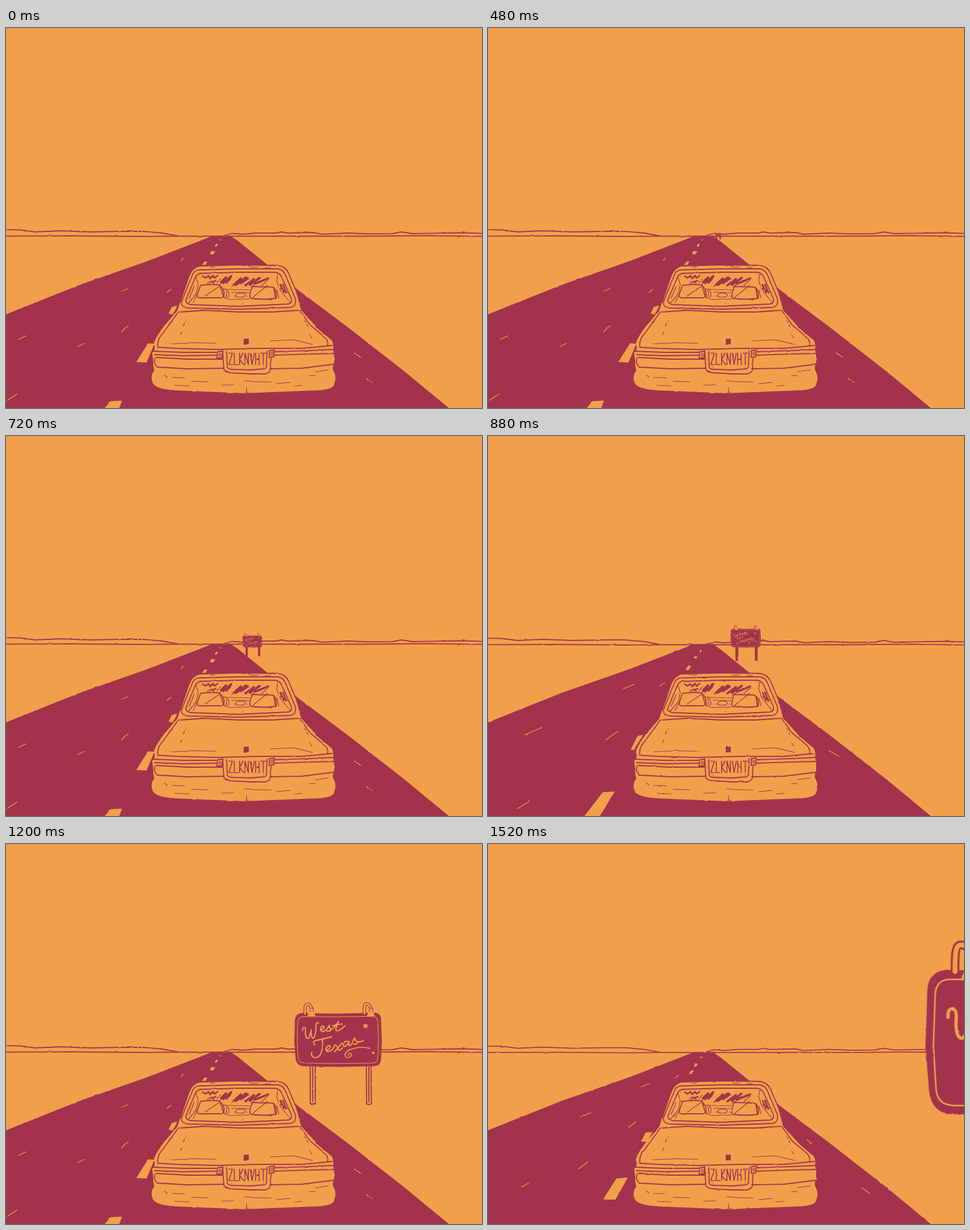
Recreate the animation shown at these times as an HTML page. Size 837 by 669 pixels, loop 1.6 s.

```html
<!DOCTYPE html>
<html lang="en">
<head>
<meta charset="utf-8">
<title>Desert road</title>
<style>
  html, body { margin: 0; width: 100%; height: 100%; overflow: hidden; background: #f0a04b; }
  svg { display: block; width: 837px; height: 669px; }
  .ink { fill: none; stroke: #a3334c; stroke-width: 1.8; stroke-linecap: round; stroke-linejoin: round; }
  .thin { stroke-width: 1.2; }
  .bold { stroke-width: 4; }
  .mid { stroke-width: 2.6; }
  .dark { fill: #a3334c; }
  .light { fill: #f0a04b; }
  .chalk { fill: none; stroke: #f0a04b; stroke-linecap: round; stroke-linejoin: round; }
  #legs path { vector-effect: non-scaling-stroke; stroke-width: 2; }
</style>
</head>
<body>
<svg viewBox="0 0 837 669">
  <defs>
    <filter id="rough" filterUnits="userSpaceOnUse" x="-10" y="-10" width="857" height="689" color-interpolation-filters="sRGB">
      <feTurbulence id="noise" type="fractalNoise" baseFrequency=".08" numOctaves="2" seed="3" result="n"/>
      <feDisplacementMap in="SourceGraphic" in2="n" scale="2" xChannelSelector="R" yChannelSelector="G"/>
    </filter>

    <g id="lamp">
      <path class="ink" style="stroke-width:10" d="M33 3 C33-16 33-28 40-28 C47-28 50-20 55-12"/>
      <path class="chalk" stroke-width="5.5" d="M33 3 C33-16 33-28 40-28 C47-28 50-20 55-12"/>
      <path class="ink" style="fill:#f0a04b" d="M47-4 Q48-13 54-15 Q60-13 60-4Z"/>
      <path class="light" d="M47-4 H60 L66 11 H40Z"/>
    </g>
  </defs>

  <g filter="url(#rough)">
    <rect class="light" x="-10" y="-10" width="857" height="689"/>

    <g id="hills" class="ink">
      <path d="M-9 366.5 L120 366 240 367 300 366.5 480 366.5 640 366.5 740 365.5 846 367"/>
      <path d="M-9 355 L25 355.5 52 359 95 357 150 359 205 358 240 358 275 361 302 366"/>
      <path d="M384 365 L398 361.5 415 363 440 361 475 361 484 359 495 361 540 360 556 363 600 361 640 362.5 680 362 695 359 715 362 770 361 805 360.5 846 362"/>
    </g>

    <path class="dark" d="M-10 508 L60 480 130 452 250 410 330 379 362 366.5 395 366 408 375 455 413 512 460 600 526 700 604 792 680 H-10Z"/>
    <path id="dashes" class="light"/>
    <path id="specks" class="chalk" stroke-width="1.2"/>

    <g id="sign">
      <g id="legs" class="ink">
        <path style="fill:#f0a04b" d="M49 165 L49 286 Q57 290 65 286 L65 165Z"/>
        <path style="fill:#f0a04b" d="M225 165 L226 286 Q233 290 241 286 L240 165Z"/>
        <path d="M57 170V280M233 170V280"/>
      </g>
      <path class="dark" d="M1 24 Q2 4 22 1 L130 3 250 0 Q271 1 271 22 L274 90 271 148 Q270 166 250 168 L140 170 26 168 Q6 165 3 142 L-1 90Z"/>
      <path class="chalk" stroke-width="1.8" d="M10 32 Q10 12 28 12 L130 13 244 11 Q261 12 261 29 L263 90 261 141 Q260 157 244 158 L130 160 30 158 Q12 157 11 138 L8 90Z"/>
      <use href="#lamp"/>
      <use href="#lamp" x="186"/>
      <g class="chalk" stroke-width="3.8">
        <path d="M25 56 Q24 46 31 46 Q36 48 34 64 Q35 82 42 80 Q49 74 52 54 Q51 80 59 80 Q67 72 68 34 Q71 29 75 33"/>
        <path d="M81 54 Q95 50 92 43 Q85 39 81 51 Q81 64 95 57 Q105 49 109 39 Q108 46 114 52 Q113 60 102 57"/>
        <path d="M114 53 Q124 50 138 27 Q124 58 133 57 Q146 54 158 41 M119 41 L149 35"/>
        <path d="M66 101 Q53 92 66 87 Q84 84 116 75 M86 85 Q92 105 82 129 Q74 144 60 140 Q51 136 54 124"/>
        <path d="M99 118 Q115 112 111 104 Q102 101 98 115 Q101 128 118 116 L127 101 Q133 102 138 117 Q141 121 150 110 M149 95 L125 123"/>
        <path d="M170 91 Q158 86 153 99 Q153 110 162 104 Q169 97 171 90 Q167 108 177 101 L188 79 Q189 86 198 92 Q197 100 184 98 M198 92 Q207 91 216 88"/>
        <path stroke-width="3" d="M236 112 Q208 104 183 113 Q160 119 158 133 Q160 143 171 140 Q182 136 177 128 Q169 125 169 133"/>
      </g>
      <path class="light" d="M222 32 l3 6 7 0 -5 5 2 7 -7-4 -6 4 2-7 -5-5 7 0Z"/>
      <circle class="light" cx="247" cy="126" r="4"/>
    </g>

    <g id="car" class="ink">
      <path class="light" stroke="none" d="M322 436 Q328 422 340 419 L410 417 478 418 Q492 420 497 432 L510 464 519 497 550 531 573 550 Q577 558 575 566 L577 574 577 590 Q572 599 577 606 Q582 616 576 630 Q570 637 545 638 L420 643 300 638 Q263 636 258 625 Q253 612 261 603 Q258 595 259 588 L257 572 Q264 566 260 556 Q262 546 277 526 L301 498 306 483Z"/>
      <path d="M306 483 L322 436 Q328 422 340 419 L410 417 478 418 Q492 420 497 432 L511 465"/>
      <path d="M338 426 L410 424 479 424 Q488 426 492 436 L509 477 Q511 490 500 492 L410 495 320 493 Q306 491 309 481 L328 434 Q331 427 338 426Z"/>
      <path d="M342 432 L410 430 473 430 Q482 431 485 439 L502 477 Q504 485 495 486 L410 490 325 487 Q314 485 317 477 L333 439 Q336 433 342 432Z"/>
      <g class="thin">
        <path d="M334 439 L338 451 335 468 320 485 M336 470 L329 483 M322 476 L331 455 M478 433 L476 445 481 460 500 484 M476 461 L480 475"/>
        <path d="M360 421 l7 -.5 M430 421 l13 0 M455 422 l10 0"/>
        <path d="M386 460 L429 461 M390 478 L428 477 M397 465 L427 466 M400 472 h2 M424 472 h2 M417 485 v.5 M404 469 Q411 465 420 468 Q423 474 412 474 Q402 474 404 469Z"/>
        <path d="M354 450 Q358 443 366 449 M356 452 L362 446 368 453 M383 459 Q393 461 392 471 Q390 479 384 475 M386 463 Q390 469 386 474"/>
      </g>
      <path style="fill:#f0a04b" d="M342 453 Q360 451 376 452 L382 472 Q382 476 374 475 L340 475 Q335 475 337 468Z M379 456 Q385 463 383 474"/>
      <path style="fill:#f0a04b" d="M432 455 L468 456 Q472 457 472 464 L474 476 Q455 479 431 476 Q427 475 430 464Z M471 457 Q477 465 475 476"/>
      <path class="thin" d="M350 472 L378 453 M434 474 L460 453"/>
      <path class="mid" d="M346 437 L351 440 356 436 359 441 364 436 367 440 372 436 M361 447 l8 -2 M483 452 L489 466 M484 459 L494 465 M487 451 L493 466"/>
      <path class="bold" d="M378 448 L387 439 M382 449 L396 437 M388 448 L394 441 M401 452 L413 441 M405 452 L422 439 M413 449 L425 441 M421 453 L436 442 M429 452 L446 440 M438 450 L461 441"/>
      <path class="thin" d="M430 456 L448 445 M450 453 L461 444 M397 455 L402 450 M371 448 L377 442"/>

      <path d="M306 500 L350 497 410 500 470 500 515 497 M303 500 L285 525 270 545 Q266 552 267 562 M517 498 L535 523 560 544 Q568 552 565 560"/>
      <path d="M267 562 L300 564 370 566 440 564 520 564 574 559 M259 569 L310 571 370 571 M473 570 L530 568 576 566"/>
      <path class="thin" d="M290 556 L330 554 369 555 M465 551 L505 549 539 557 M314 519 l-2 6 M317 515 v1 M309 535 l-2 5 M525 515 l3 4 M529 522 l2 4 M534 541 l4 5"/>
      <path d="M261 575 L310 577 371 576 M473 576 L530 574 577 573 M264 580 L320 583 380 583 M266 597 L320 600 382 599 M464 600 L520 599 576 592 M262 581 Q259 590 266 597"/>
      <path d="M372 570 L381 569 380 581 371 581Z M463 568 L472 567 471 579 463 580Z"/>
      <path class="thin" d="M375 573 h3 v5 h-3Z M466 571 h3 v5 h-3Z"/>
      <path d="M381 568 L383 600 Q384 606 395 607 L430 609 456 609 Q465 607 465 600 L466 582"/>
      <path d="M388 570 L389 597 Q390 601 397 601 L430 602 454 600 Q458 599 458 594 L459 569"/>
      <path class="thin" d="M396 597 v1 M452 596 v1 M279 611 l4 4 M292 615 L314 616 M326 622 L354 623 M420 621 L443 623 466 623 M297 629 L322 630 M379 629 L400 628 M476 626 L500 624 M507 630 l14 -1 M545 605 L567 602 M534 612 l10 0 M420 642 l7 -1 M423 633 v8"/>
      <rect class="dark" stroke="none" x="418" y="547" width="9" height="10"/>
      <g id="plate" style="stroke-width:1.7"></g>
    </g>
  </g>
</svg>
<script>
const $ = id => document.getElementById(id);
const STEP = 80, LOOP = 1600;

// Three drawings of the passing road surface, cycled
const poses = [
  {
    seed: 3, drop: 0,
    dashes: "M250 555L261 556 247 589 229 588ZM184 657L204 656 195 680 164 680ZM292 490L301 489 294 504 286 503ZM349 411L354 411 351 417 345 417ZM361 392L368 392 364 399 359 398ZM369 380L373 380 370 385 367 385ZM376 372h2l-1 2h-2Z",
    specks: "M22 548L35 542M204 463L214 459M126 561L138 555M203 535L215 524M283 466L290 460M-5 660L20 644M612 572L624 580M634 617L644 624M308 409L312 405"
  },
  {
    seed: 11, drop: .6,
    dashes: "M226 589L246 587 224 626 202 626ZM277 508L289 507 280 524 269 524ZM358 398L362 399 358 405 353 405ZM364 386L369 387 366 392 362 392ZM374 374L377 374 375 377 373 377Z",
    specks: "M268 428L284 422M162 481L181 473M247 499L260 489M159 572L175 560M59 604L73 596M657 605L672 616M561 520L569 528M329 412L335 407"
  },
  {
    seed: 24, drop: 1,
    dashes: "M202 627L223 626 190 680 161 680ZM263 528L273 526 256 553 251 552ZM352 404L357 405 353 412 347 412ZM363 388L368 388 366 392 362 391ZM373 377L376 377 374 381 372 381Z",
    specks: "M238 445L257 437M65 526L95 513M207 535L228 520M52 656L73 643M600 554L617 564M302 440L311 434"
  }
];

// Sign approach: step, left, top, scale
const keys = [
  [6, 400, 361, .035],
  [9, 416, 351, .125],
  [13, 443, 321, .3],
  [14, 470, 307, .42],
  [17, 624, 266, 1],
  [19, 771, 220, 1.52]
];

const glyphs = {
  Z: "M0 0H6L0 20H7", L: "M0 0V20H6", K: "M0 0V20M6 0L0 11 7 20", N: "M0 20V0L6 20V0",
  V: "M0 0L3 20 7 0", H: "M0 0V20M6 0V20M0 10H6", T: "M0 0H8M4 0V20"
};

$("plate").innerHTML = [..."ZLKNVHT"]
  .map((c, i) => `<path d="${glyphs[c]}" transform="translate(${392 + i * 9.4} 572.5)"/>`).join("");

function placeSign(n) {
  const sign = $("sign");
  sign.style.display = n < keys[0][0] ? "none" : "";
  if (n < keys[0][0]) return;
  let i = 0;
  while (i < keys.length - 2 && n >= keys[i + 1][0]) i++;
  const [n0, x0, y0, s0] = keys[i], [n1, x1, y1, s1] = keys[i + 1];
  const s = s0 * (s1 / s0) ** ((n - n0) / (n1 - n0));
  const k = (s - s0) / (s1 - s0); // position follows size
  sign.setAttribute("transform", `translate(${x0 + (x1 - x0) * k} ${y0 + (y1 - y0) * k}) scale(${s})`);
}

let shown = -1;
function draw() {
  const n = Math.floor(performance.now() % LOOP / STEP);
  if (n !== shown) {
    shown = n;
    const pose = poses[n % 3];
    $("noise").setAttribute("seed", pose.seed);
    $("hills").setAttribute("transform", `translate(0 ${pose.drop})`);
    $("dashes").setAttribute("d", pose.dashes);
    $("specks").setAttribute("d", pose.specks);
    placeSign(n);
  }
  requestAnimationFrame(draw);
}
draw();
</script>
</body>
</html>
```
